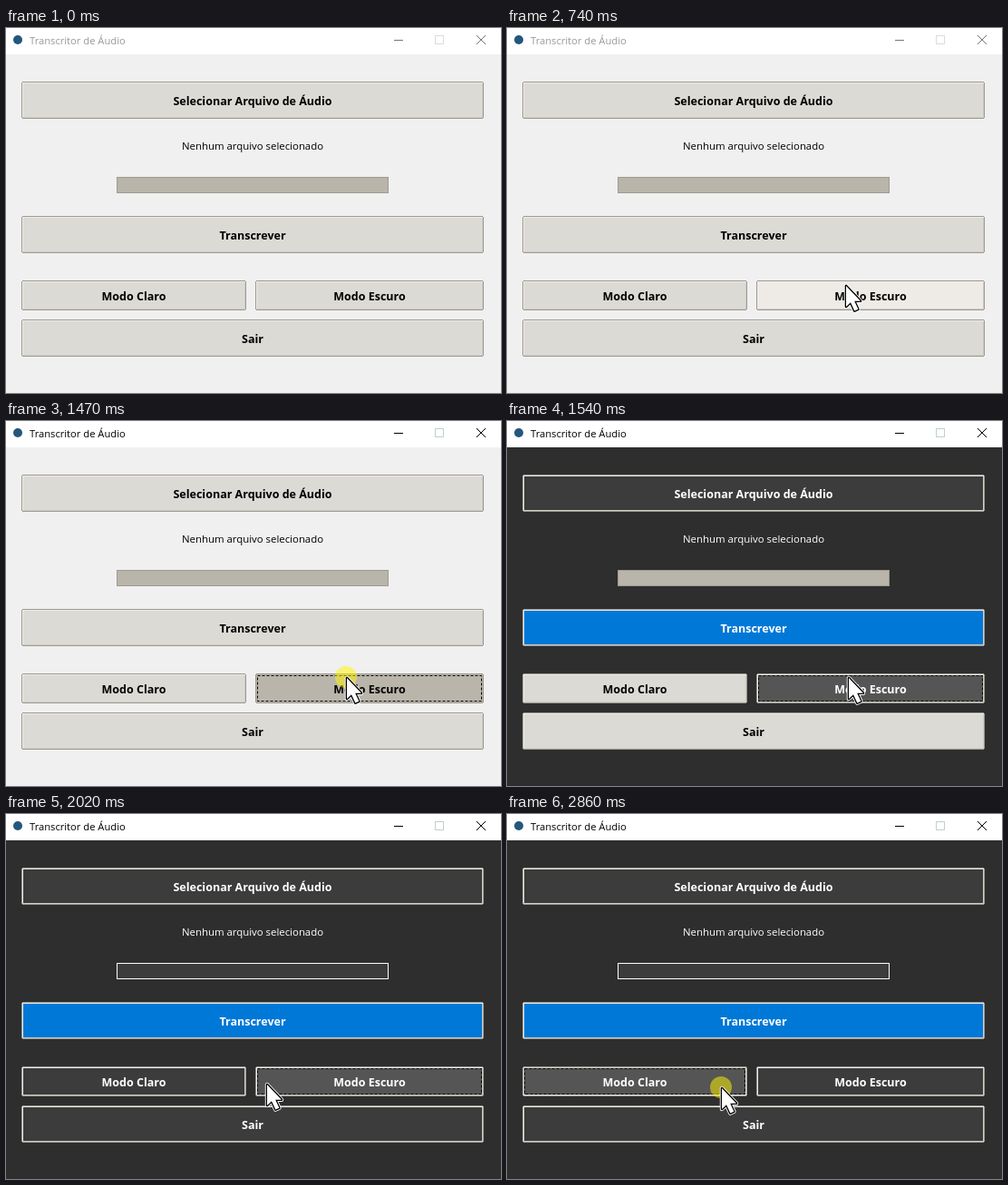
Write an HTML page with a canvas that moves like this. It is 546 px wide and 402 px high and loops after 2930 ms.

```html
<!DOCTYPE html>
<html lang="pt">
<head>
<meta charset="utf-8">
<title>Transcritor de Áudio</title>
<style>
html, body { margin: 0; width: 100%; height: 100%; overflow: hidden; background: #f0f0f0; }
canvas { display: block; }
</style>
</head>
<body>
<canvas id="stage" width="546" height="402"></canvas>
<script>
const ctx = document.getElementById('stage').getContext('2d');
const LOOP = 2930, STEP = 70;
const CLICK_DARK = 1470, DARK = 1540, DARK_ALL = 1610, CLICK_LIGHT = 2860;
const FONT = '"Open Sans", "Noto Sans", sans-serif';

// Pointer path: time, x, y
const path = [
  [320, 452, 394], [390, 438, 360], [530, 399, 308], [740, 373, 283], [999, 373, 283],
  [1000, 374, 282], [1070, 375, 282], [1470, 375, 282], [1540, 376, 282],
  [1680, 364, 284], [2020, 287, 297], [2440, 252, 300], [2860, 236, 301]
];

const buttons = [
  { id: 'select', text: 'Selecionar Arquivo de Áudio', x: 17, y: 59, w: 510, h: 41, dark: DARK },
  { id: 'run', text: 'Transcrever', x: 17, y: 207, w: 510, h: 41, dark: DARK, accent: '#0078d7' },
  { id: 'light', text: 'Modo Claro', x: 17, y: 278, w: 248, h: 33, dark: DARK_ALL },
  { id: 'dark', text: 'Modo Escuro', x: 275, y: 278, w: 252, h: 33, dark: DARK },
  { id: 'quit', text: 'Sair', x: 17, y: 321, w: 510, h: 41, dark: DARK_ALL }
];

function rect(x, y, w, h, color) {
  ctx.fillStyle = color;
  ctx.fillRect(x, y, w, h);
}

function frame(x, y, w, h, color, dash = []) {
  ctx.strokeStyle = color;
  ctx.lineWidth = 1;
  ctx.setLineDash(dash);
  ctx.strokeRect(x + 0.5, y + 0.5, w - 1, h - 1);
  ctx.setLineDash([]);
}

function line(color, ...p) {
  ctx.strokeStyle = color;
  ctx.lineWidth = 1;
  ctx.beginPath();
  for (let i = 0; i < p.length; i += 4) {
    ctx.moveTo(p[i], p[i + 1]);
    ctx.lineTo(p[i + 2], p[i + 3]);
  }
  ctx.stroke();
}

function disc(x, y, r, color) {
  ctx.fillStyle = color;
  ctx.beginPath();
  ctx.arc(x, y, r, 0, Math.PI * 2);
  ctx.fill();
}

function label(text, x, y, font, color, align = 'center') {
  ctx.font = font + ' ' + FONT;
  ctx.fillStyle = color;
  ctx.textAlign = align;
  ctx.fillText(text, x, y);
}

// The picture is refreshed in short fixed steps
function snap(t) {
  const base = t < 1000 ? 320 : t < 1470 ? 1000 : t < 1950 ? 1470 : 1950;
  return base + Math.floor((t - base) / STEP) * STEP;
}

function pointer(t) {
  if (t < path[0][0]) return null;
  const s = snap(t);
  const i = path.findIndex(p => p[0] > s);
  if (i < 0) {
    const [, x, y] = path[path.length - 1];
    return { x, y };
  }
  const [t0, x0, y0] = path[i - 1], [t1, x1, y1] = path[i];
  const k = (s - t0) / (t1 - t0);
  return { x: Math.round(x0 + (x1 - x0) * k), y: Math.round(y0 + (y1 - y0) * k) };
}

function titleBar(active) {
  rect(0, 0, 546, 29, '#fff');
  disc(13, 13, 5, '#24577c');
  label('Transcritor de Áudio', 26, 18, '11.2px', active ? '#000' : '#999', 'left');
  const ink = active ? '#000' : '#777';
  line(ink, 428, 13.5, 438, 13.5);
  frame(473, 8, 10, 10, active ? '#bfd0d0' : '#dcdcdc');
  line(ink, 519, 8, 529, 18, 529, 8, 519, 18);
}

function drawButton(b, t, mouse, focus) {
  const { x, y, w, h } = b;
  const dark = t >= b.dark;
  const hover = mouse && mouse.x >= x && mouse.x < x + w && mouse.y >= y && mouse.y < y + h;
  const pressed = hover && ((t >= CLICK_DARK && t < DARK) || t >= CLICK_LIGHT);
  let fill = dark ? b.accent || '#3c3c3c' : '#dcdad5';
  if (hover) fill = dark ? '#555' : pressed ? '#bab5ab' : '#eeebe7';

  rect(x + 1, y + 1, w - 2, h - 2, fill);
  // Outer border without its corner pixels
  line('#9e9a91',
    x + 1, y + 0.5, x + w - 1, y + 0.5, x + 1, y + h - 0.5, x + w - 1, y + h - 0.5,
    x + 0.5, y + 1, x + 0.5, y + h - 1, x + w - 0.5, y + 1, x + w - 0.5, y + h - 1);
  const [hi, lo] = pressed
    ? (dark ? ['#cfcdc8', '#eeebe7'] : ['#bab5ab', '#bab5ab'])
    : ['#eeebe7', '#cfcdc8'];
  line(hi, x + 1, y + 1.5, x + w - 1, y + 1.5, x + 1.5, y + 1, x + 1.5, y + h - 1);
  line(lo, x + 1, y + h - 1.5, x + w - 1, y + h - 1.5, x + w - 1.5, y + 2, x + w - 1.5, y + h - 1);
  if (focus === b.id) frame(x + 2, y + 2, w - 4, h - 4, '#000', [3, 2]);
  label(b.text, x + w / 2, y + h / 2 + 5.5, 'bold 12.5px', dark ? '#fff' : '#000');
}

function progress(dark) {
  rect(122, 164, 300, 18, dark ? '#3c3c3c' : '#bab5ab');
  frame(122, 164, 300, 18, dark ? '#fff' : '#9e9a91');
}

function arrow({ x, y }) {
  const shape = new Path2D('M0 0V23L5 18.3L9.3 27.6L13.4 25.7L9.2 16.7H16Z');
  ctx.save();
  ctx.translate(x + 1, y + 1);
  ctx.lineJoin = 'round';
  ctx.lineWidth = 4.4;
  ctx.strokeStyle = '#fff';
  ctx.stroke(shape);
  ctx.lineWidth = 2.6;
  ctx.strokeStyle = '#000';
  ctx.stroke(shape);
  ctx.fillStyle = '#fff';
  ctx.fill(shape);
  ctx.restore();
}

function draw(t) {
  const dark = t >= DARK;
  const mouse = pointer(t);
  const focus = t >= CLICK_LIGHT ? 'light' : t >= CLICK_DARK ? 'dark' : '';
  rect(0, 0, 546, 402, dark ? '#2e2e2e' : '#f0f0f0');
  titleBar(t >= CLICK_DARK);
  label('Nenhum arquivo selecionado', 272, 134, '11.4px', dark ? '#fff' : '#000');
  progress(t >= DARK_ALL);
  for (const b of buttons) drawButton(b, t, mouse, focus);
  if (!mouse) return;
  const click = (t >= CLICK_DARK && t < DARK) || t >= CLICK_LIGHT;
  if (click) disc(mouse.x, mouse.y, 12, 'rgba(255, 245, 0, 0.52)');
  arrow(mouse);
}

function tick() {
  draw(performance.now() % LOOP);
  requestAnimationFrame(tick);
}
tick();
</script>
</body>
</html>
```
